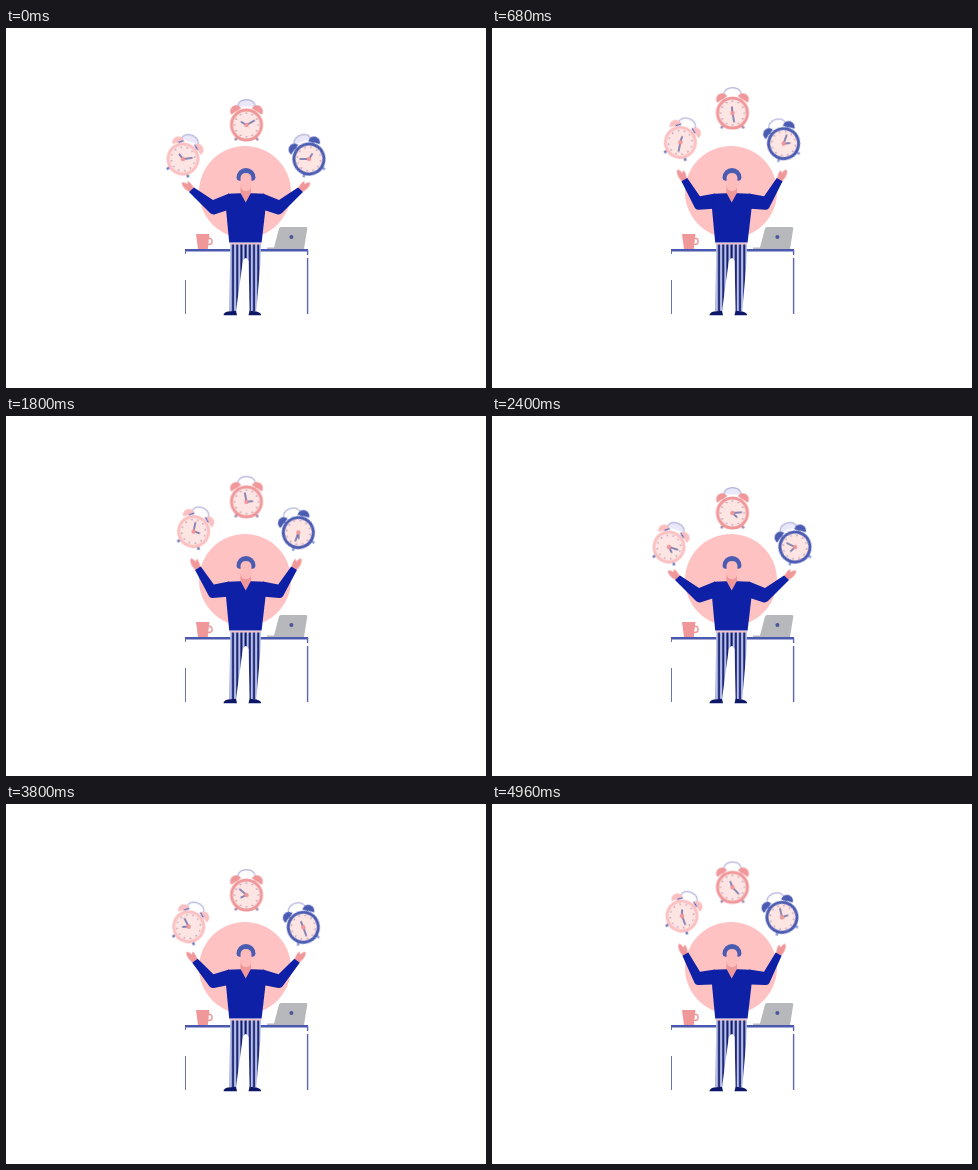
Recreate the animation shown at these times as an HTML page. Size 480 by 360 pixels, loop 5 s.

```html
<!DOCTYPE html>
<html lang="en">
<head>
<meta charset="utf-8">
<title>Juggling time</title>
<style>
  html, body { margin: 0; width: 100%; height: 100%; overflow: hidden; background: #fff; }
  svg { display: block; width: 100vw; height: 100vh; }

  .lift, .arm, .handle, .minute, .hour { animation: 5s infinite; }
  .lift, .arm, .handle { animation-timing-function: cubic-bezier(.33, 0, .67, 1); }
  .lift { animation-name: lift; }
  .arm { animation-name: arm; }
  .handle { animation-name: handle; }
  .minute, .hour { animation-name: turn; animation-timing-function: linear; }
  .minute { --from: var(--m); --sweep: 803.6deg; }
  .hour { --from: var(--h); --sweep: 401.8deg; }

  @keyframes lift {
    0%, 46.8%, 68% { transform: var(--low); }
    17.5%, 32%, 85.5%, 100% { transform: var(--high); }
  }
  @keyframes arm {
    0%, 46.8%, 68% { d: path("M183 164 L188 159.5 L207 172 L223 165.6 L222 182 L209 186.3 Q206 187 204 185Z"); }
    17.5%, 32%, 85.5%, 100% { d: path("M190.4 151.8 L196.3 148.6 L208 167.8 L223 165.6 L221 180.5 L206.5 181 Q203.6 181.2 202.6 179Z"); }
  }
  @keyframes handle {
    0%, 46.8%, 68% { fill-opacity: 1; }
    6%, 42%, 74% { fill-opacity: 0; }
    17.5%, 32%, 85.5%, 100% { fill-opacity: 0; }
  }
  @keyframes turn {
    from { transform: rotate(var(--from)); }
    to { transform: rotate(calc(var(--from) + var(--sweep))); }
  }
</style>
</head>
<body>
<svg viewBox="0 0 480 360">
  <defs>
    <pattern id="stripes" x="224" width="4.2" height="10" patternUnits="userSpaceOnUse">
      <rect width="4.2" height="10" fill="#b9c2ec"/>
      <rect x="2" width="2" height="10" fill="#0d1768"/>
    </pattern>
  </defs>

  <circle cx="239" cy="164" r="46" fill="#ffc2c2"/>

  <g id="desk">
    <path d="M179 222.3H302" stroke="#4a58b0" stroke-width="2.4"/>
    <path d="M179.5 223V226M179.5 252V286" stroke="#6a74b4"/>
    <path d="M301.6 222V227M301.6 230V286" stroke="#5a66b8" stroke-width="1.4"/>
    <circle cx="203" cy="213.4" r="3.1" fill="none" stroke="#f0979a" stroke-width="1.4"/>
    <path d="M190 206H203.4L201.8 221H192Z" fill="#f0979a"/>
    <path d="M261 219.4H268L273 200.5Q273.5 199 275 199H300Q301.6 199 301.3 200.6L298 221H261Z" fill="#b6b8bb"/>
    <circle cx="285.4" cy="209" r="2" fill="#4d5596"/>
  </g>

  <g id="legs">
    <path d="M224.2 216H255L254.4 236L250.2 283.5H243.6L242.6 233Q240 227 236.8 233L230 283.5H223.6Z" fill="url(#stripes)"/>
    <path d="M217.5 287.3Q217.5 284.5 222 283.6L230 282.8L231 287.3ZM242.5 287.3L243.6 282.8L250.5 283.4Q255 284.5 255.2 287.3Z" fill="#0d1768"/>
  </g>

  <g id="arms"></g>

  <path d="M222 165.7L234 165.3H246L258 165.7L259.5 181L255.6 214.5H223.2L220 181Z" fill="#0d20a6"/>
  <path d="M223.6 215.7H255.4" stroke="#f7c3cb" stroke-width="1.6"/>
  <path d="M234.6 157H245V164.7L239.7 174.5L234.4 164.7Z" fill="#f0979a"/>
  <path d="M230.5 149.8A9.5 9.8 0 0 1 249.5 149.8Q249.3 152.4 246.8 152.8H233.2Q230.7 152.4 230.5 149.8Z" fill="#4a5bb2"/>
  <path d="M234.6 149.6Q235 145.2 240 145Q245 145.2 245.4 149.6V157.5Q244.8 163 240 163.2Q235.2 163 234.6 157.5Z" fill="#fdbcbb"/>

  <g id="clocks"></g>
</svg>

<script>
  const arm = flip => `
    <g ${flip ? 'transform="translate(480) scale(-1 1)"' : ''}>
      <path class="lift" fill="#f0979a"
        style="--low: translate(185.6px, 161.6px) rotate(-49deg); --high: translate(193.2px, 150px) rotate(-27deg)"
        d="M-2.7 1.5C-4.2 -3 -4.2 -8.6 -1.8 -11.6Q.4 -12.6 1.6 -6.6L3.4 -8.4Q4.8 -7.6 4 -4L2.7 1.5Z"/>
      <path class="arm" fill="#0d20a6"/>
    </g>`;

  const clock = ({ low, high, tilt, minute, hour, ring, base, feet }) => {
    const pose = ([x, y]) => `translate(${x}px, ${y}px) rotate(${tilt}deg)`;
    const bell = side => `
      <g transform="rotate(${side * 37})">
        <path d="M-5.9 -17.3A5.9 6 0 0 1 5.9 -17.3Z" fill="${ring}"/>
        <path d="M${side * -5.9} -17.3H0" stroke="${base}" stroke-width="1.2"/>
      </g>`;
    return `
    <g class="lift" style="--low: ${pose(low)}; --high: ${pose(high)}; --m: ${minute}deg; --h: ${hour}deg">
      <path class="handle" d="M-8.8 -18.4C-8.4 -27.8 8.4 -27.8 8.8 -18.4" fill="#eae7f8" stroke="#b1b3dc" stroke-width="1.3"/>
      <path d="M-9 11.8L-11.4 15.4M9 11.8L11.4 15.4" stroke="${feet}" stroke-width="2.6"/>
      ${bell(-1)}${bell(1)}
      <circle r="15" fill="#fde5e3" stroke="${ring}" stroke-width="3"/>
      <circle r="11.8" fill="none" stroke="#a0789c" stroke-width="1.2"
        pathLength="12" stroke-dasharray=".18 .82" stroke-dashoffset=".09"/>
      <path class="hour" d="M0 1V-6.6" stroke="#343f94" stroke-width="1.2"/>
      <path class="minute" d="M0 1.5V-9.4" stroke="#2b388f" stroke-width="1.1"/>
      <circle r="2.2" fill="#f0979a"/>
    </g>`;
  };

  document.getElementById('arms').innerHTML = arm(false) + arm(true);
  document.getElementById('clocks').innerHTML = [
    { low: [177, 131], high: [190, 112], tilt: 21, minute: 61, hour: 301, ring: '#fbc0c1', base: '#4a5bb2', feet: '#6f7cc0' },
    { low: [240.5, 97], high: [240.5, 83.3], tilt: 0, minute: 60, hour: 300, ring: '#f0979a', base: '#f0979a', feet: '#a98cb0' },
    { low: [303, 131], high: [290, 113.3], tilt: -20, minute: 290, hour: 52, ring: '#4a5bb2', base: '#4a5bb2', feet: '#8f9cd6' }
  ].map(clock).join('');
</script>
</body>
</html>
```
